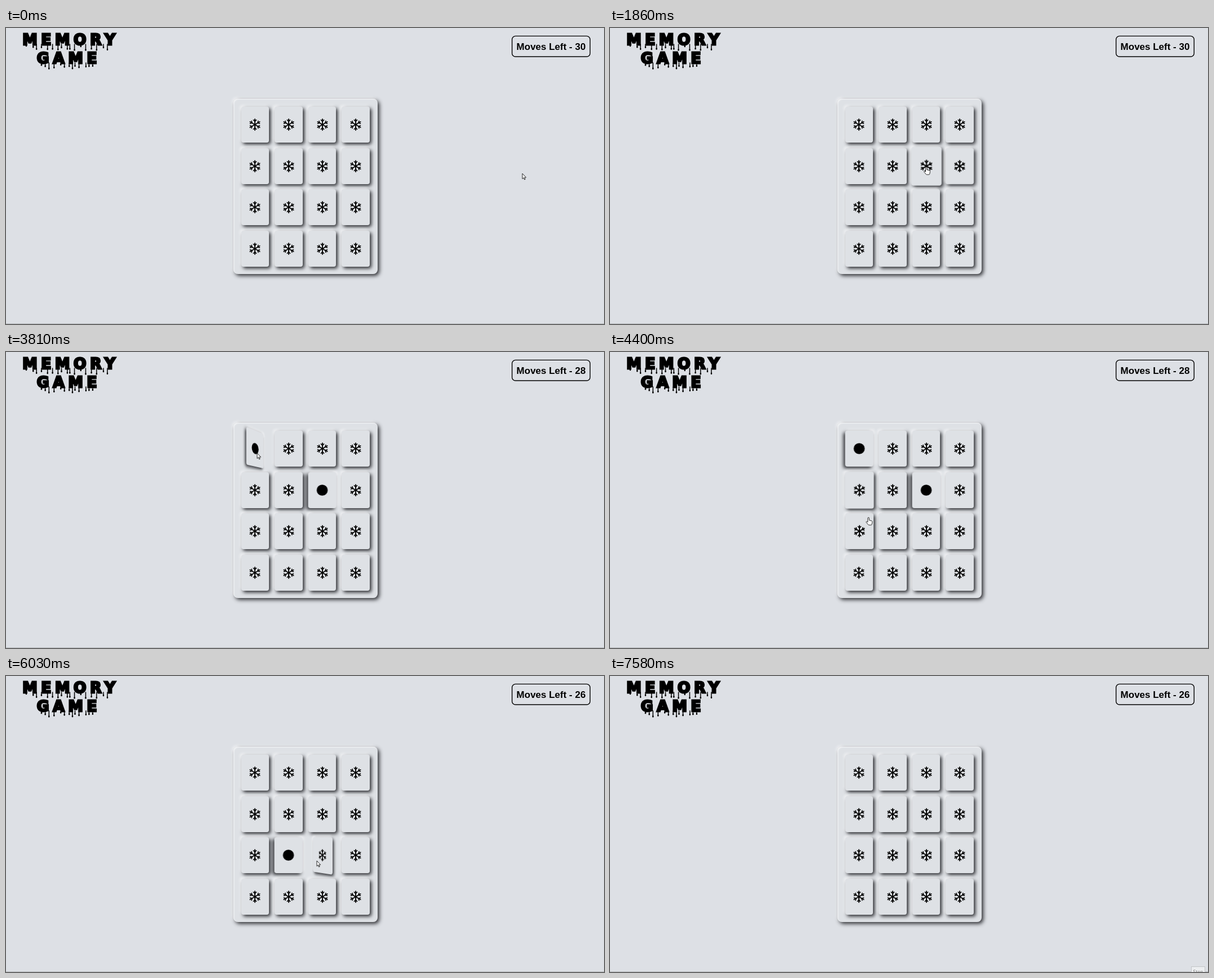
An HTML page that plays this animation: 1062x527 px, repeating every 7.61 s.

```html
<!DOCTYPE html>
<html lang="en">
<head>
<meta charset="utf-8">
<title>Memory Game</title>
<style>
  html, body { margin: 0; width: 100%; height: 100%; overflow: hidden; background: #dde0e5; }
  #stage { position: relative; width: 1062px; height: 527px; overflow: hidden; background: #dde0e5; }
  #stage > * { position: absolute; }
  #head { left: 0; top: 0; }
  .title {
    font: bold 26.5px "DejaVu Sans", sans-serif; letter-spacing: 6.7px; text-anchor: middle;
    stroke: #000; stroke-width: 3px;
  }
  #moves { font: bold 17px "Liberation Sans", Arial, sans-serif; text-anchor: middle; }
  #board {
    left: 404px; top: 126px; width: 256px; height: 312px; border-radius: 8px;
    background: #dee1e5; perspective: 500px; perspective-origin: 127px 156px;
    box-shadow: 3px 3px 7px #2b2c30, -2px -2px 4px #f8f9fb, inset 1px 1px 2px #f6f7f9;
  }
  .card {
    position: absolute; width: 49.6px; height: 64.2px; border-radius: 4px; background: #dee1e5;
    box-shadow: 3px 3px 6px #2b2c30, -2px -2px 4px #f8f9fb;
  }
  .card svg { position: absolute; left: 12.8px; top: 20.1px; }
  #line { left: 0; top: 526px; width: 1062px; height: 1px; background: #b4b7bb; }
  #tip {
    left: 1032px; top: 517px; width: 25px; height: 20px; box-sizing: border-box;
    border: 1px solid #c3c5c8; background: #eceef0; text-align: center;
    font: 8.5px/18px "Open Sans", sans-serif; color: #777;
  }
  #cursor { left: 0; top: 0; overflow: visible; }
</style>
</head>
<body>
<div id="stage">
  <svg id="head" width="1062" height="90">
    <text class="title" x="115" y="29.5">MEMORY</text>
    <text class="title" x="111.5" y="62.5">GAME</text>
    <g id="drips" stroke="#000" stroke-linecap="round"></g>
    <rect x="898.7" y="14.4" width="138.6" height="36.6" rx="6" fill="none" stroke="#000" stroke-width="1.4"/>
    <text id="moves" x="968" y="39.2"></text>
  </svg>
  <div id="board"></div>
  <div id="line"></div>
  <div id="tip">Stop</div>
  <svg id="cursor" width="20" height="20" fill="#fff" stroke="#111" stroke-width=".9" stroke-linejoin="round">
    <path id="arrow" d="M0 0V9.6L2.2 7.6L3.7 11L5.2 10.3L3.7 7.1H6.6Z"/>
    <path id="hand" d="M-1.5 7V.8A1.2 1.2 0 0 1 .9 .8V4.5L4.9 5.4Q6.7 5.9 6.5 7.6L5.7 11.8Q5.5 13 4.3 13H.6Q-.3 13-.9 12.2L-4.2 8.2Q-4.7 7.2-3.8 6.7Q-2.9 6.4-1.5 8Z"/>
  </svg>
</div>
<script>
const LOOP = 7610, STEP = 10, HOVER = 400, FLIP = 550, SHOW = 1000;
const CARD_W = 49.6, CARD_H = 64.2;
const $ = id => document.getElementById(id);
const clamp = v => Math.max(0, Math.min(1, v));
const smooth = v => v * v * (3 - 2 * v);
const mix = (a, b, p) => a + (b - a) * p;

// where the pointer rests: x, y, arrival, departure
const stops = [
  [917, 259, 0, 30],
  [626, 249, 880, 1200],
  [562, 248, 1860, 2420],
  [447, 246, 2960, 3080],
  [446, 180, 3270, 3960],
  [462, 318, 4555, 4760],
  [498, 322, 5150, 5460],
  [552, 329, 5800, 6040],
  [632, 372, 6240, 6300],
  [985, 532, 7120, LOOP]
];

// each pair of clicked cards is shown, then turned back together
const turn = (a, ta, b, tb) => [
  { card: a, open: ta, close: tb + SHOW },
  { card: b, open: tb, close: tb + SHOW }
];
const flips = [...turn(6, 2050, 0, 3480), ...turn(9, 5360, 10, 5840)];

function pointer(t) {
  const i = stops.findIndex(s => t <= s[3]);
  const to = stops[i], from = stops[Math.max(0, i - 1)];
  const p = t >= to[2] ? 1 : smooth((t - from[3]) / (to[2] - from[3]));
  return [mix(from[0], to[0], p), mix(from[1], to[1], p)];
}

const cardX = i => 417.6 + (i % 4) * 59.6;
const cardY = i => 140 + (i >> 2) * 73.6;
const isUp = (i, t) => flips.some(f => f.card === i && t >= f.open && t < f.close);

function cardAt(t) {
  const [x, y] = pointer(t);
  for (let i = 0; i < 16; i++) {
    const dx = x - cardX(i), dy = y - cardY(i);
    if (dx >= 0 && dx <= CARD_W && dy >= 0 && dy <= CARD_H) return isUp(i, t) ? -1 : i;
  }
  return -1;
}

function angle(i, t) {
  const f = flips.find(f => f.card === i);
  if (!f) return 0;
  const part = at => smooth(clamp((t - at) / FLIP));
  return 180 * (part(f.open) - part(f.close));
}

// hover strength of each card, worked out once for the whole loop
const levels = [];
let level = Array(16).fill(0);
for (let t = 0; t <= LOOP; t += STEP) {
  const over = cardAt(t);
  level = level.map((v, i) => clamp(v + (i === over ? 1 : -1) * STEP / HOVER));
  levels.push(level);
}

const arm = `<path d="M0 0V-9.9" stroke-width="1.9"/><path d="M-2.6-8.3L0-5.7L2.6-8.3" stroke-width="1.6"/>`;
const flake = Array.from({ length: 6 }, (_, k) => `<g transform="rotate(${k * 60})">${arm}</g>`).join("");
const cards = Array.from({ length: 16 }, (_, i) => {
  const el = document.createElement("div");
  el.className = "card";
  el.style.left = cardX(i) - 404 + "px";
  el.style.top = cardY(i) - 126 + "px";
  el.innerHTML = `<svg width="24" height="24" viewBox="-12 -12 24 24">
    <g fill="none" stroke="#000" stroke-linecap="round">${flake}</g>
    <circle r="9.8"/></svg>`;
  $("board").append(el);
  return { el, front: el.querySelector("g"), back: el.querySelector("circle") };
});

// paint running down from a line of lettering
let seed = 7;
const random = () => (seed = seed * 16807 % 2147483647) / 2147483647;
function drips(from, to, y) {
  let out = "";
  for (let x = from; x < to; x += 4 + random() * 9) {
    const end = y + 3 + random() * 8;
    out += `<path d="M${x} ${y}V${end}" stroke-width="1.5"/><path d="M${x} ${end - 1}v1" stroke-width="2.4"/>`;
  }
  return out;
}
$("drips").innerHTML = drips(36, 185, 29) + drips(63, 156, 62);

function draw(t) {
  const now = levels[Math.floor(t / STEP)];
  cards.forEach((c, i) => {
    const a = angle(i, t), s = 1 + 0.1 * smooth(now[i]);
    c.el.style.transform = a || s > 1 ? `rotateY(${-a}deg) scale(${s})` : "none";
    c.front.style.display = a < 90 ? "" : "none";
    c.back.style.display = a < 90 ? "none" : "";
  });
  const [x, y] = pointer(t), hand = cardAt(t) >= 0;
  $("cursor").style.transform = `translate(${x}px, ${y}px)`;
  $("hand").style.display = hand ? "" : "none";
  $("arrow").style.display = hand ? "none" : "";
  $("moves").textContent = "Moves Left - " + (30 - flips.filter(f => t >= f.open).length);
  $("tip").style.display = t >= 7540 ? "" : "none";
}

const start = performance.now();
function tick() {
  draw((performance.now() - start) % LOOP);
  requestAnimationFrame(tick);
}
tick();
</script>
</body>
</html>
```
